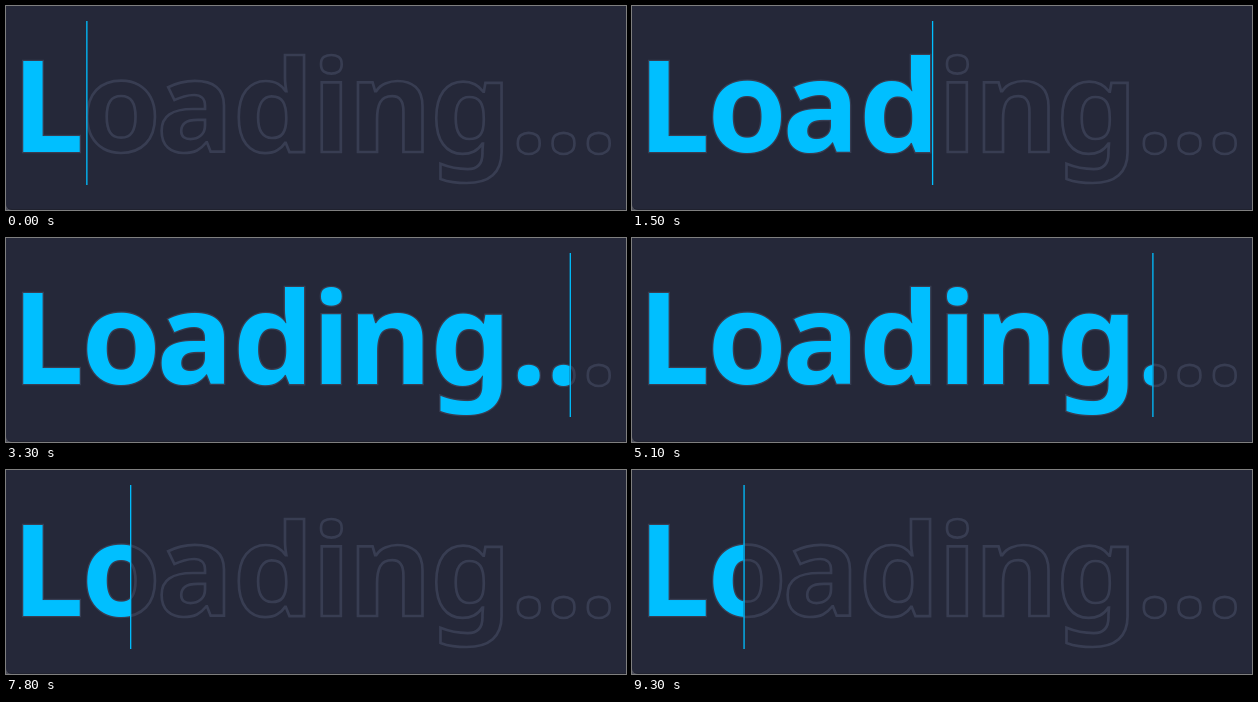
An HTML page that plays this animation: 620x204 px, repeating every 9.4 s.

```html
<!DOCTYPE html>
<html lang="en">
<head>
<meta charset="utf-8">
<title>Loading</title>
<style>
  @property --x {
    syntax: "<length>";
    inherits: true;
    initial-value: 80.2px;
  }
  html, body {
    margin: 0;
    width: 100%;
    height: 100%;
    overflow: hidden;
    background: #4b4d59;
  }
  .stage {
    position: relative;
    box-sizing: border-box;
    width: 620px;
    height: 204px;
    overflow: hidden;
    background: #252839;
    border-bottom: 1px solid #20222f;
    border-bottom-left-radius: 6px;
    animation: sweep 9400ms -4ms infinite;
  }
  svg {
    position: absolute;
    top: 0;
    left: 0;
    font: 700 128px "Noto Sans", "Open Sans", sans-serif;
    text-anchor: middle;
  }
  .outline {
    fill: none;
    stroke: #383d52;
    stroke-width: 2.7px;
  }
  .fill {
    fill: #00bfff;
    clip-path: inset(0 calc(620px - var(--x)) 0 0);
  }
  .edge {
    fill: #00bfff;
    transform: translateX(var(--x));
  }
  /* The edge advances in 100 ms ticks, rests at the right, then returns. */
  @keyframes sweep {
    0%        { --x: 80.2px;  animation-timing-function: steps(36); }
    38.29787% { --x: 607.6px; animation-timing-function: steps(1); }
    39.3617%  { --x: 610px;   animation-timing-function: steps(1); }
    47.87234% { --x: 608.3px; animation-timing-function: steps(40); }
    90.42553% { --x: 21.3px;  animation-timing-function: steps(1); }
    91.48936% { --x: 9.3px;   animation-timing-function: steps(8); }
    100%      { --x: 126px; }
  }
</style>
</head>
<body>
<div class="stage">
  <svg width="620" height="204" aria-label="Loading...">
    <defs>
      <text id="word" y="146" x="42 115 188.8 267.5 325.3 384 465 522.8 557.6 592.8">Loading...</text>
    </defs>
    <use href="#word" class="outline"/>
  </svg>
  <svg class="fill" width="620" height="204" aria-hidden="true">
    <use href="#word"/>
  </svg>
  <svg width="620" height="204" aria-hidden="true">
    <rect class="edge" y="15" width="1.3" height="164"/>
  </svg>
</div>
</body>
</html>
```
